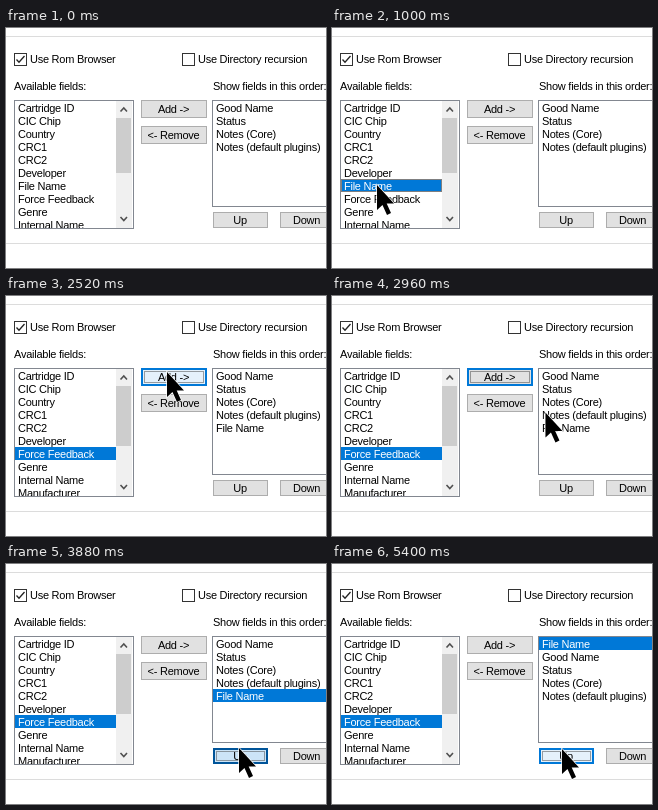
Recreate the animation shown at these times as an HTML page with a canvas. Size 320 by 240 pixels, loop 5.56 s.

```html
<!DOCTYPE html>
<html lang="en">
<head>
<meta charset="utf-8">
<title>Choosing fields</title>
<style>
html, body { margin: 0; width: 100%; height: 100%; overflow: hidden; background: #fff; }
canvas { display: block; }
</style>
</head>
<body>
<canvas id="stage" width="320" height="240"></canvas>
<script>
const g = document.getElementById('stage').getContext('2d');
const LOOP = 5560, STEP = 40, ROW = 13, BLUE = '#0078d7';

const names = ['Cartridge ID', 'CIC Chip', 'Country', 'CRC1', 'CRC2', 'Developer', 'File Name',
  'Force Feedback', 'Genre', 'Internal Name', 'Manufacturer'];
const order = ['Good Name', 'Status', 'Notes (Core)', 'Notes (default plugins)'];

// Cursor tip: time, x, y
const path = [
  [0, -20, 173], [560, 43, 159], [600, 48, 162], [640, 52, 164], [680, 45, 157],
  [1320, 45, 157], [1720, 161, 76], [2680, 161, 76], [3120, 236, 134],
  [3280, 236, 134], [3480, 233, 184], [5240, 233, 184], [5400, 230, 185]
];
const upClicks = [[3840, 3960], [4120, 4240], [4520, 4640], [4720, 4840]];

const clamp = v => Math.max(0, Math.min(1, v));
const ramp = (t, a, b) => clamp((t - a) / (b - a));
const ease = p => p * p * (3 - 2 * p);
const mix = (a, b, p) => a.map((v, i) => v + (b[i] - v) * p);
const rgb = c => `rgb(${c.map(Math.round)})`;

function fill(color, x, y, w, h) {
  g.fillStyle = color;
  g.fillRect(x, y, w, h);
}

function frame(color, x, y, w, h, dash = []) {
  g.strokeStyle = color;
  g.lineWidth = 1;
  g.setLineDash(dash);
  g.strokeRect(x + .5, y + .5, w - 1, h - 1);
  g.setLineDash([]);
}

function text(s, x, y, color = '#000', align = 'left') {
  g.fillStyle = color;
  g.textAlign = align;
  g.fillText(s, x, y);
}

function line(color, width, ...pts) {
  g.strokeStyle = color;
  g.lineWidth = width;
  g.beginPath();
  pts.forEach(p => g.lineTo(...p));
  g.stroke();
}

function checkBox(x, label, checked) {
  frame('#333', x, 25, 13, 13);
  if (checked) line('#222', 1.3, [x + 2.5, 31.5], [x + 5, 34.3], [x + 10.5, 28]);
  text(label, x + 16, 35);
}

function button(x, y, w, h, label, hover = 0, press = 0, focus = false) {
  const face = mix(mix([225, 225, 225], [229, 241, 251], hover), [204, 228, 247], press);
  const edge = mix(mix([173, 173, 173], [0, 120, 215], focus ? 1 : hover), [0, 84, 153], press);
  fill(rgb(face), x, y, w, h);
  frame(rgb(edge), x, y, w, h);
  if (focus) {
    frame(rgb(edge), x + 1, y + 1, w - 2, h - 2);
    frame('#444', x + 3, y + 3, w - 6, h - 6, [1, 1]);
  }
  text(label, x + w / 2 - .5, y + h / 2 + 4, '#000', 'center');
}

function list(x, y, w, h, items, selected, rowWidth, focus) {
  fill('#fff', x, y, w, h);
  g.save();
  g.beginPath();
  g.rect(x + 1, y + 1, w - 2, h - 2);
  g.clip();
  items.forEach((s, i) => {
    const top = y + 1 + i * ROW, on = i === selected;
    if (on) {
      fill(BLUE, x + 1, top, rowWidth, ROW);
      if (focus) frame('#ff8728', x + 1, top, rowWidth, ROW, [1, 1]);
    }
    text(s, x + 4, top + 11, on ? '#fff' : '#000');
  });
  g.restore();
  frame('#828790', x, y, w, h);
}

function scrollBar(thumb) {
  fill('#f0f0f0', 110, 73, 16, 127);
  fill('#cdcdcd', 110, 90, 15, thumb);
  line('#505050', 1.6, [114.5, 83.5], [117.8, 80], [121, 83.5]);
  line('#505050', 1.6, [114.5, 189], [117.8, 192.5], [121, 189]);
}

function cursor(t) {
  const i = Math.max(1, path.findIndex(p => p[0] >= t));
  const a = path[i - 1], b = t > path.at(-1)[0] ? path.at(-1) : path[i];
  const [, x, y] = mix(a, b, ease(ramp(t, a[0], b[0])));
  g.beginPath();
  [[0, 0], [0, 25], [5.5, 20], [10, 30], [14, 28], [9.7, 18.5], [17, 18.5]]
    .forEach(([dx, dy]) => g.lineTo(x + dx, y + dy));
  g.closePath();
  g.strokeStyle = '#fff';
  g.lineWidth = 1.4;
  g.stroke();
  g.fillStyle = '#000';
  g.fill();
}

const pressed = (t, [down, up]) => t < down ? 0 : 1 - ramp(t, up, up + 120);

function draw(t) {
  fill('#fff', 0, 0, 320, 240);
  fill('#dcdcdc', 0, 8, 320, 1);
  fill('#dcdcdc', 0, 215, 320, 1);
  checkBox(8, 'Use Rom Browser', true);
  checkBox(176, 'Use Directory recursion', false);
  text('Available fields:', 8, 62);
  text('Show fields in this order:', 207, 62);

  const added = t >= 2160;
  const left = names.filter(s => !added || s !== 'File Name');
  list(8, 72, 120, 129, left, t >= 960 ? 6 : -1, 101, t >= 960 && !added);
  scrollBar(added ? 60 : 55);

  const right = order.slice();
  const place = 4 - upClicks.filter(c => t >= c[1]).length;
  if (added) right.splice(place, 0, 'File Name');
  list(206, 72, 130, 107, right, t >= 3240 ? place : -1, 128, t >= 3240 && t < 3840);

  const addHover = ramp(t, 1600, 1800) - ramp(t, 2760, 2960);
  button(135, 72, 66, 18, 'Add ->', addHover, pressed(t, [1920, 2160]), t >= 1920 && t < 3240);
  button(135, 98, 66, 18, '<- Remove');
  const upPress = Math.max(...upClicks.map(c => pressed(t, c)));
  button(207, 184, 55, 16, 'Up', ramp(t, 3480, 3720), upPress, t >= 3840);
  button(274, 184, 54, 16, 'Down');
  cursor(t);
}

function tick(now) {
  g.font = '11px "Liberation Sans", Arial, sans-serif';
  g.letterSpacing = '-0.25px';
  draw(Math.floor(now % LOOP / STEP) * STEP);
  requestAnimationFrame(tick);
}
tick(performance.now());
</script>
</body>
</html>
```
